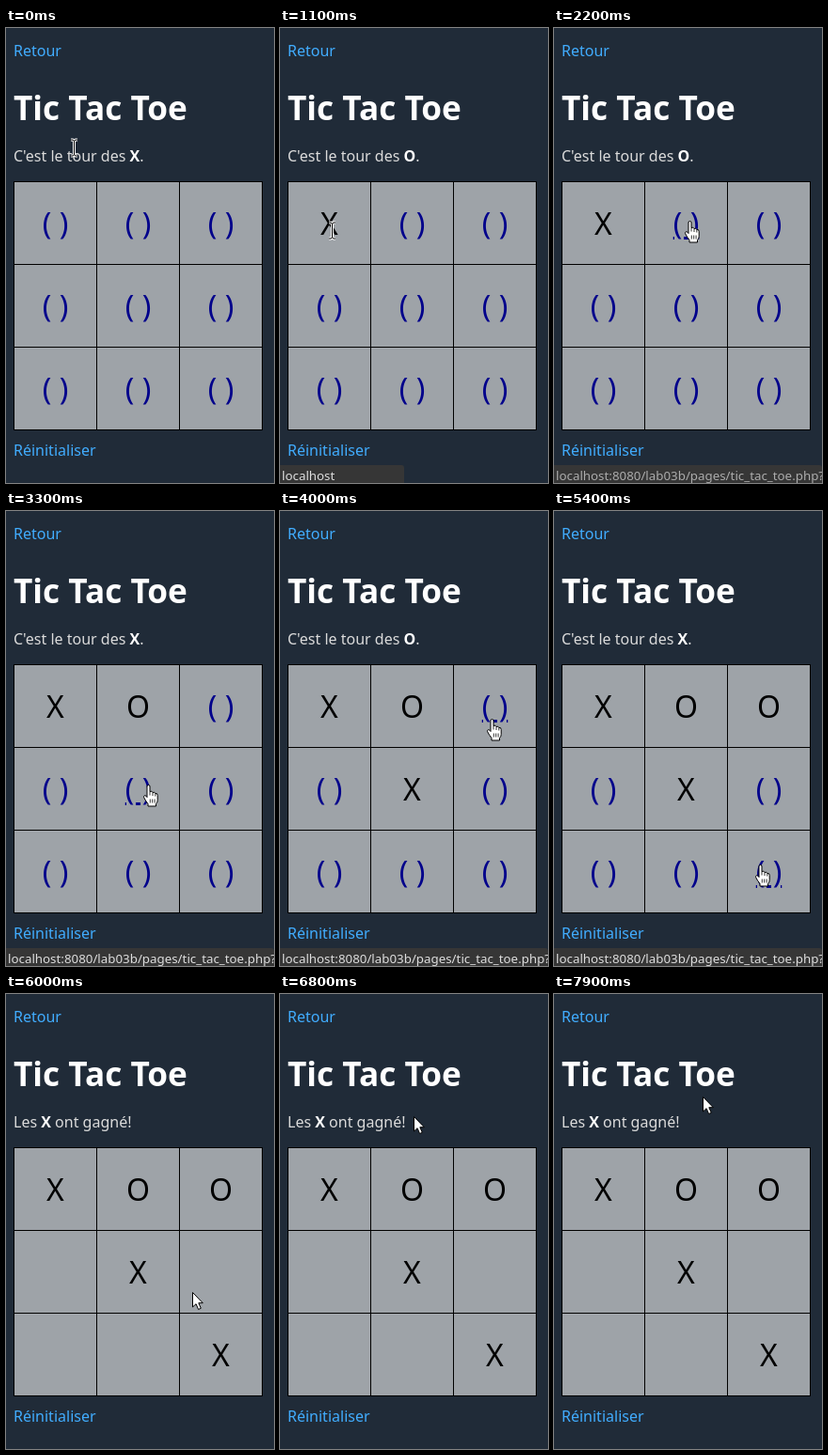
Animation, 285 px wide and 484 px high, one loop 8 s. Source, as an HTML page:

```html
<!DOCTYPE html>
<html lang="fr">
<head>
<meta charset="utf-8">
<title>Tic Tac Toe</title>
<style>
  html, body { margin: 0; width: 100%; height: 100%; overflow: hidden; background: #202b38; }
  body { font: 16px "Noto Sans", sans-serif; color: #dbdbdb; cursor: default; }
  #stage { position: absolute; left: 0; top: 0; width: 285px; height: 484px; overflow: hidden; }
  #stage > * { position: absolute; white-space: pre; }
  .text { left: 8px; line-height: normal; }
  .link { color: #41adff; }
  h1 { margin: 0; top: 60px; font-size: 35.2px; font-weight: 700; color: #fff; }
  b { color: #fff; }
  #board { left: 8px; top: 163px; width: 265px; height: 265px; background: #000; }
  .cell { position: absolute; width: 87px; height: 87px; background: #9ea3a8; color: #000;
    font-size: 32px; text-align: center; line-height: normal; }
  .cell span { position: absolute; left: 0; right: 0; top: 22px; }
  .open { color: #00008b; }
  .hover { text-decoration: underline; }
  #status { left: 0; top: 465px; height: 19px; background: #363636; color: #dedede;
    font-size: 13.333px; overflow: hidden; border-top-right-radius: 3px; }
  #status span { position: absolute; left: 2px; top: 2px; }
  #pointer { left: 0; top: 0; overflow: visible; }
</style>
</head>
<body>
<div id="stage">
  <div class="text link" style="top:13px">Retour</div>
  <h1 class="text">Tic Tac Toe</h1>
  <div class="text" id="message" style="top:125px"></div>
  <div id="board"></div>
  <div class="text link" style="top:438px">Réinitialiser</div>
  <div id="status"><span></span></div>
  <svg id="pointer" width="1" height="1">
    <g id="arrow">
      <path d="M0 0V15.5L3.6 12.2 6.1 18 8.8 16.8 6.3 11.2H10.8Z" fill="#fff" stroke="#000"/>
    </g>
    <g id="beam" fill="none">
      <path d="M-3.5-8.5H-1.5L0-7.5 1.5-8.5H3.5M0-7.5V7.5M-3.5 8.5H-1.5L0 7.5 1.5 8.5H3.5" stroke="#fff" stroke-width="3"/>
      <path d="M-3.5-8.5H-1.5L0-7.5 1.5-8.5H3.5M0-7.5V7.5M-3.5 8.5H-1.5L0 7.5 1.5 8.5H3.5" stroke="#000"/>
    </g>
    <g id="hand" stroke="#000" stroke-linejoin="round">
      <path d="M-1.5 13V1.5Q-1.5 0 0 0T1.5 1.5V7Q3.8 5.8 4.5 8 6.8 6.9 7.3 9 9.7 8.4 9.7 11V16Q9.7 18.5 8 20V22.5H-.5V20Q-3 17-4.8 13.3C-5.6 11.2-3.4 10-1.5 13Z" fill="#fff"/>
      <path d="M1.5 7V11M4.5 8V11.5M7.3 9V12M1.8 15V19M4.2 15V19M6.6 15V19" fill="none" stroke-width=".8"/>
    </g>
  </svg>
</div>
<script>
const LOOP = 8000, STEP = 100;
const $ = id => document.getElementById(id);

// [time, x, y] of the pointer's hot spot
const path = [
  [0, 72, 127], [800, 55, 215], [1100, 55, 215], [1500, 130, 205], [1800, 130, 205],
  [1900, 144, 205], [2400, 144, 205], [3200, 151, 291], [3500, 151, 291], [4000, 225, 221],
  [4500, 225, 221], [5300, 219, 376], [5600, 219, 376], [5700, 218, 378], [5800, 218, 378],
  [6600, 137, 133], [6700, 137, 133], [6800, 142, 130], [7000, 6, 100], [7300, 60, 125],
  [7400, 60, 125], [7500, 52, 150], [7600, 95, 174], [7700, 165, 172], [7800, 175, 140],
  [7900, 158, 109]
];
// [time, cell, mark]
const moves = [[1100, 0, "X"], [2400, 1, "O"], [3500, 4, "X"], [4500, 2, "O"], [5600, 8, "X"]];

const URL_TEXT = "localhost:8080/lab03b/pages/tic_tac_toe.php?";
const HOST = "localhost";
// [time, text, text opacity, bar opacity]
const statuses = [
  [0, "", 0, 0], [700, URL_TEXT, 1, 1], [1100, HOST, 1, 1], [1200, "", 0, 0],
  [1500, URL_TEXT, 1, 1], [2100, URL_TEXT, .85, 1], [2200, URL_TEXT, .7, 1],
  [2400, HOST, 1, 1], [2500, "", 0, 0], [3200, URL_TEXT, .7, 1], [3300, URL_TEXT, 1, 1],
  [3500, HOST, 1, 1], [3600, "", 0, 0], [4000, URL_TEXT, 1, 1], [4200, URL_TEXT, 1, .5],
  [4300, "", 0, 0], [5300, URL_TEXT, .7, 1], [5400, URL_TEXT, 1, 1],
  [5600, HOST, 1, 1], [5700, "", 0, 0]
];

const cells = Array.from({ length: 9 }, (_, i) => {
  const col = i % 3, row = Math.floor(i / 3);
  const box = document.createElement("div"), label = document.createElement("span");
  const inner = document.createElement("span");
  box.className = "cell";
  box.style.left = 1 + 88 * col + "px";
  box.style.top = 1 + 88 * row + "px";
  inner.style.position = "static";
  label.append(inner);
  box.append(label);
  $("board").append(box);
  return { inner, x: 52.5 + 88 * col, y: 208 + 88 * row };
});

function pointerAt(t) {
  const i = path.findIndex(p => p[0] > t);
  if (i < 0) return path[path.length - 1].slice(1);
  const [t0, x0, y0] = path[i - 1], [t1, x1, y1] = path[i];
  const k = (t - t0) / (t1 - t0);
  return [Math.round(x0 + (x1 - x0) * k), Math.round(y0 + (y1 - y0) * k)];
}

function draw(t) {
  const [x, y] = pointerAt(t);
  const played = moves.filter(m => m[0] <= t);
  const won = played.length === moves.length;
  const inside = (left, top, right, bottom) => x >= left && x <= right && y >= top && y <= bottom;

  let shape = inside(8, 61, 192, 108) || inside(8, 125, won ? 133 : 147, 147) ? "beam" : "arrow";
  cells.forEach((cell, i) => {
    const move = played.find(m => m[1] === i);
    const text = move ? move[2] : won ? "" : "( )";
    const half = move ? 10 : 14;
    const over = text && inside(cell.x - half, cell.y - 22, cell.x + half, cell.y + 21);
    if (over) shape = move ? "beam" : "hand";
    cell.inner.textContent = text;
    cell.inner.className = move ? "" : over ? "open hover" : "open";
  });

  $("message").innerHTML = won
    ? "Les <b>X</b> ont gagné!"
    : `C'est le tour des <b>${"XO"[played.length % 2]}</b>.`;

  const [, text, ink, bar] = statuses.filter(s => s[0] <= t).pop();
  const status = $("status");
  status.style.width = text === HOST ? "132px" : "285px";
  status.style.opacity = bar;
  status.firstChild.textContent = text;
  status.firstChild.style.opacity = ink;

  for (const id of ["arrow", "beam", "hand"]) {
    $(id).style.display = id === shape ? "" : "none";
  }
  $(shape).setAttribute("transform", `translate(${x + .5} ${y + .5})`);
}

const start = performance.now();
let shown = -1;
function tick() {
  const t = Math.floor((performance.now() - start) % LOOP / STEP) * STEP;
  if (t !== shown) draw(shown = t);
  requestAnimationFrame(tick);
}
tick();
</script>
</body>
</html>
```
